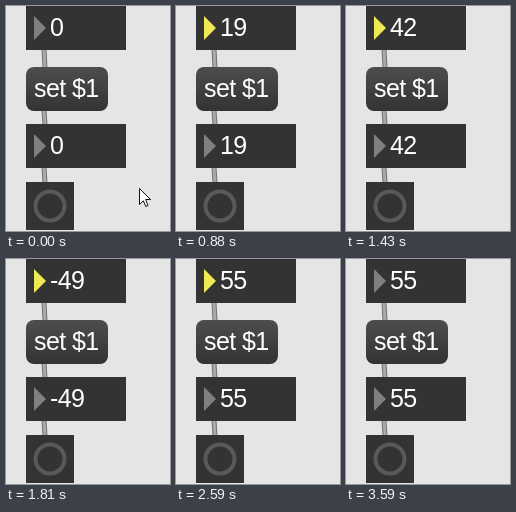
Recreate the animation shown at these times as an HTML page. Size 164 by 225 pixels, loop 3.69 s.

```html
<!DOCTYPE html>
<html lang="en">
<head>
<meta charset="utf-8">
<title>Number box patch</title>
<style>
  html, body { margin: 0; width: 100%; height: 100%; overflow: hidden; background: #e5e5e5; }
  svg { display: block; width: 164px; height: 225px; }
  text { font: 25px "Liberation Sans", Arial, sans-serif; letter-spacing: -.6px; fill: #fff; }
  .box { fill: #333; }
  .arrow { fill: #808080; }
  .active { fill: #eee955; }
</style>
</head>
<body>
<svg viewBox="0 0 164 225">
  <defs>
    <linearGradient id="shade" x1="0" y1="0" x2="0" y2="1">
      <stop offset="0" stop-color="#4d4d4d"/>
      <stop offset="1" stop-color="#333"/>
    </linearGradient>
    <path id="cords" d="M38 43L39 62M38 104L39 119M38 161L39 177"/>
  </defs>
  <rect width="164" height="225" fill="#e5e5e5"/>
  <use href="#cords" stroke="#737373" stroke-width="5"/>
  <use href="#cords" stroke="#a9a9a9" stroke-width="3"/>

  <rect class="box" x="20" width="100" height="44"/>
  <path id="dial" class="arrow" d="M28 10L40 22L28 34Z"/>
  <text class="value" x="44" y="30">0</text>

  <rect x="20" y="61" width="82" height="44" rx="8" fill="url(#shade)"/>
  <text x="28" y="91">set $1</text>

  <rect class="box" x="20" y="118" width="100" height="44"/>
  <path class="arrow" d="M28 128L40 140L28 152Z"/>
  <text class="value" x="44" y="148">0</text>

  <rect class="box" x="20" y="176" width="48" height="48"/>
  <circle cx="44" cy="200" r="14.5" fill="none" stroke="#595959" stroke-width="4"/>

  <path id="cursor" d="M.5 .5V16.5L4.3 12.8L6.8 18.5L9 17.5L6.6 11.5H11.5Z"
        fill="#fff" stroke="#111" stroke-width="1"/>
</svg>
<script>
const LOOP = 3690;
const PRESS = 650, RELEASE = 2670, EXIT = 3360, DESELECT = 3590;

// Bursts of evenly spaced updates; the picture rests between them.
const bursts = [
  { start: 70, end: 500, steps: 7 },
  { start: 800, end: 1270, steps: 7 },
  { start: 1350, end: 1810, steps: 7 },
  { start: 1980, end: 2440, steps: 7 },
  { start: 2520, end: 2980, steps: 7 },
  { start: 3050, end: EXIT, steps: 5 }
];

const dial = document.getElementById("dial");
const cursor = document.getElementById("cursor");
const labels = document.querySelectorAll(".value");

const progress = (t, from, to) => Math.min(1, Math.max(0, (t - from) / (to - from)));
const easeOut = (t, from, to) => 1 - (1 - progress(t, from, to)) ** 2;
const easeInOut = (t, from, to) => (1 - Math.cos(Math.PI * progress(t, from, to))) / 2;

// Snap to the latest update; the small lead absorbs timer rounding.
function snap(t) {
  const burst = bursts.findLast(({ start }) => start <= t);
  if (!burst) return 0;
  const { start, end, steps } = burst;
  const gap = (end - start) / (steps - 1);
  return start + gap * Math.min(steps - 1, Math.floor((t - start) / gap + 0.12));
}

// Drag up, then far down, then up again.
const valueAt = t => Math.round(
  44 * easeOut(t, 722, 1350) - 93 * easeInOut(t, 1390, 1810) + 104 * easeInOut(t, 1900, 2486)
);

// Glide to the number box, then leave through the bottom edge.
function cursorAt(t) {
  const come = 1 - easeInOut(t, 0, 500);
  const leave = easeInOut(t, 2717, 3390);
  return [67 + 66 * come + 73 * leave, 23 + 159 * come + 192 * leave].map(Math.round);
}

function draw(now) {
  const t = now % LOOP;
  const step = snap(t);
  const visible = t < PRESS || (step >= RELEASE && step < EXIT);

  for (const label of labels) label.textContent = valueAt(step);
  dial.classList.toggle("active", t >= PRESS && t < DESELECT);
  cursor.setAttribute("visibility", visible ? "visible" : "hidden");
  cursor.setAttribute("transform", `translate(${cursorAt(step)})`);
}

const begin = performance.now();
function tick() {
  draw(performance.now() - begin);
  requestAnimationFrame(tick);
}
tick();
</script>
</body>
</html>
```
